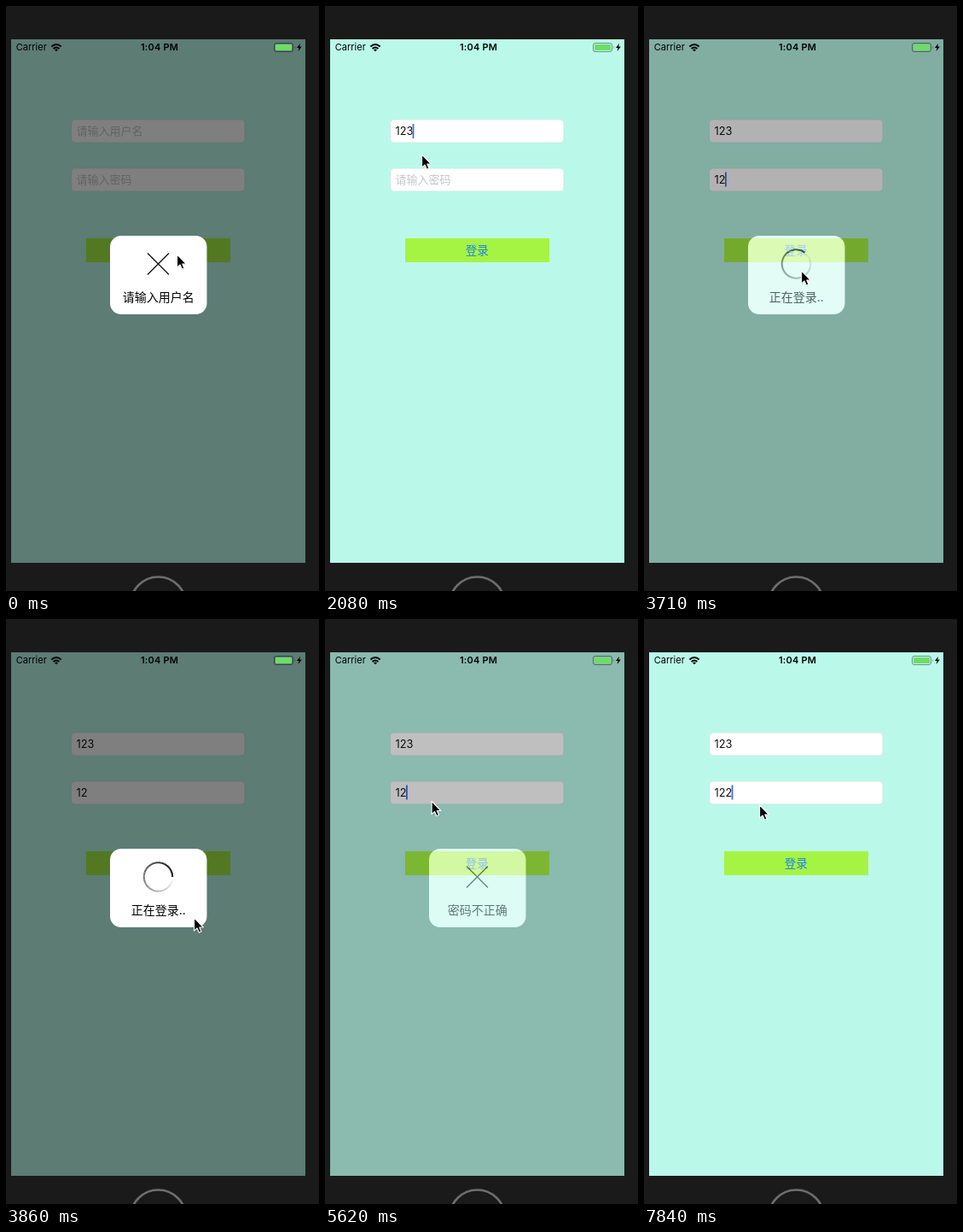
These frames come from a looping animation (367 px wide and 685 px high, 8000 ms). An HTML page:

```html
<!DOCTYPE html>
<html lang="zh-CN">
<head>
<meta charset="utf-8">
<title>Login</title>
<style>
html, body { margin: 0; width: 100%; height: 100%; overflow: hidden; background: #1a1a1a; }
svg { display: block; width: 100%; height: 100%; }
text { font-family: Inter, "Noto Sans CJK SC", "Noto Sans CJK", sans-serif; }
.mid { text-anchor: middle; }
.field { fill: #fff; stroke: #c9e6de; stroke-width: .8; }
.hint { font-size: 13px; fill: #c5c5ca; }
.value { font-size: 12.8px; fill: #111; }
.caret { fill: #426bf2; }
</style>
</head>
<body>
<svg viewBox="0 0 367 685">
  <rect width="367" height="685" fill="#1a1a1a"/>
  <circle cx="178.5" cy="701" r="32.5" fill="none" stroke="#6e6e6e" stroke-width="2.6"/>
  <rect x="6" y="39" width="345" height="613" fill="#baf9e9"/>

  <rect class="field" x="76.5" y="133" width="203.5" height="27" rx="4.5"/>
  <rect class="field" x="76.5" y="190" width="203.5" height="27" rx="4.5"/>
  <text class="hint" id="userHint" x="82.5" y="151">请输入用户名</text>
  <text class="hint" id="passHint" x="82.5" y="208">请输入密码</text>
  <text class="value" id="user" x="82.5" y="151"></text>
  <text class="value" id="pass" x="82.5" y="208"></text>
  <rect class="caret" id="userCaret" y="138" width="1.8" height="17"/>
  <rect class="caret" id="passCaret" y="194.5" width="1.8" height="17"/>
  <rect x="94" y="272" width="169" height="28" fill="#a5f443"/>
  <text class="mid" id="login" x="178.2" y="291.2" font-size="13.5" fill="#1a7ff0">登录</text>

  <g id="hud">
    <rect x="6" y="39" width="345" height="613" fill="#000" opacity=".5"/>
    <rect x="122" y="269" width="113.5" height="92" rx="13" fill="#fff"/>
    <path id="cross" d="M166 289.5L191 314.5M191 289.5L166 314.5" stroke="#111" stroke-width="1.3"/>
    <g id="spinner" fill="none" stroke="#000" stroke-width="2"></g>
    <text class="mid" id="message" x="178.7" y="345.5" font-size="14"></text>
  </g>

  <text x="11.8" y="52.3" font-size="11">Carrier</text>
  <g fill="none" stroke="#000" stroke-width="2">
    <path d="M53.4 47.6Q59 42.4 64.6 47.6M55.6 50Q59 47 62.4 50"/>
    <path d="M57 51.2Q59 49.6 61 51.2L59 53.3Z" fill="#000" stroke="none"/>
  </g>
  <text class="mid" x="180" y="52.3" font-size="11" font-weight="600" letter-spacing=".2">1:04 PM</text>
  <rect x="314.5" y="43.5" width="22" height="10" rx="2.4" fill="none" stroke="#000" stroke-opacity=".42"/>
  <rect x="316" y="45" width="19" height="7" rx="1" fill="#6fdc67"/>
  <path d="M338 46.8Q339.6 48.5 338 50.2Z" fill="#000" opacity=".45"/>
  <path d="M345 43.8L341 49H343.5L342.6 53L346.8 47.6H344.2Z"/>

  <g id="cursor">
    <path d="M.6 .9V16.2L4.1 13L6.4 18.2L9 17L6.8 12H11.4Z" transform="translate(.4 1)" opacity=".18"/>
    <path d="M.6 .9V16.2L4.1 13L6.4 18.2L9 17L6.8 12H11.4Z" stroke="#fff" stroke-width="1.1" stroke-linejoin="round"/>
  </g>
</svg>
<script>
const LOOP = 8000, TICKS = 54;
const $ = id => document.getElementById(id);
const show = (id, on) => $(id).setAttribute('visibility', on ? 'inherit' : 'hidden');

// Pointer path: tick, x, y
const path = [
  [0, 200, 290], [1, 184, 258], [2, 148, 205], [3, 121, 168], [4, 118, 148],
  [13, 118, 148], [14, 113, 173], [15, 110, 195], [19, 110, 195],
  [20, 126, 228], [21, 155, 285], [22, 169, 309], [23, 161, 286], [24, 158, 276],
  [25, 184, 309], [26, 220, 349], [31, 220, 349], [34, 178, 288], [37, 130, 219],
  [39, 119, 206], [41, 118, 204], [42, 118, 178], [43, 119, 148], [44, 119, 148],
  [45, 122, 165], [46, 130, 205], [47, 144, 255], [48, 154, 284], [50, 154, 284],
  [51, 150, 266], [52, 141, 237], [53, 135, 217]
];
const caretX = [82.5, 88.5, 95, 102.6];

function pointer(k) {
  const i = path.findIndex(p => p[0] >= k);
  if (i < 1) return path[0].slice(1);
  const [a, x, y] = path[i - 1], [b, u, v] = path[i];
  const f = (k - a) / (b - a);
  return [x + (u - x) * f, y + (v - y) * f];
}

const count = (k, times) => times.filter(t => k >= t).length;

function field(name, text, caretOn) {
  $(name).textContent = text;
  show(name + 'Hint', !text);
  show(name + 'Caret', caretOn);
  $(name + 'Caret').setAttribute('x', caretX[text.length]);
}

// Ring that fades backwards from its head
function buildSpinner() {
  const n = 72, r = 16.7, step = 2 * Math.PI / n;
  const at = a => `${r * Math.cos(a)} ${r * Math.sin(a)}`;
  for (let i = 0; i < n; i++) {
    const seg = document.createElementNS('http://www.w3.org/2000/svg', 'path');
    seg.setAttribute('d', `M${at(-i * step)}A${r} ${r} 0 0 0 ${at(-(i + 1.1) * step)}`);
    seg.setAttribute('opacity', 1 - i / n);
    $('spinner').append(seg);
  }
}

function hudAlpha(k) {
  if (k === 1 || k === 38) return .5;
  if (k === 25) return .6;
  return k < 1 || (k > 25 && k < 38) ? 1 : 0;
}

function draw(t) {
  const k = Math.min(TICKS - 1, Math.floor(t * TICKS / LOOP + .1));
  const blink = (k + 6) % 7 < 4;

  field('user', '123'.slice(0, count(k, [10, 11, 13])), k >= 8 && k < 16);
  field('pass', '122'.slice(0, count(k, [18, 19, 41])), k >= 16 && (k < 22 || k === 40 || blink));
  $('login').setAttribute('opacity', k === 24 ? .2 : 1);

  const busy = k >= 25 && k < 33;
  $('hud').setAttribute('opacity', hudAlpha(k));
  show('cross', !busy);
  show('spinner', busy);
  $('spinner').setAttribute('transform', `translate(178.5 302) rotate(${(k - 26) * 53.3})`);
  $('message').textContent = busy ? '正在登录..' : k < 25 ? '请输入用户名' : '密码不正确';

  $('cursor').setAttribute('transform', `translate(${pointer(k)})`);
}

buildSpinner();
const start = performance.now();
function frame() {
  draw((performance.now() - start) % LOOP);
  requestAnimationFrame(frame);
}
frame();
</script>
</body>
</html>
```
